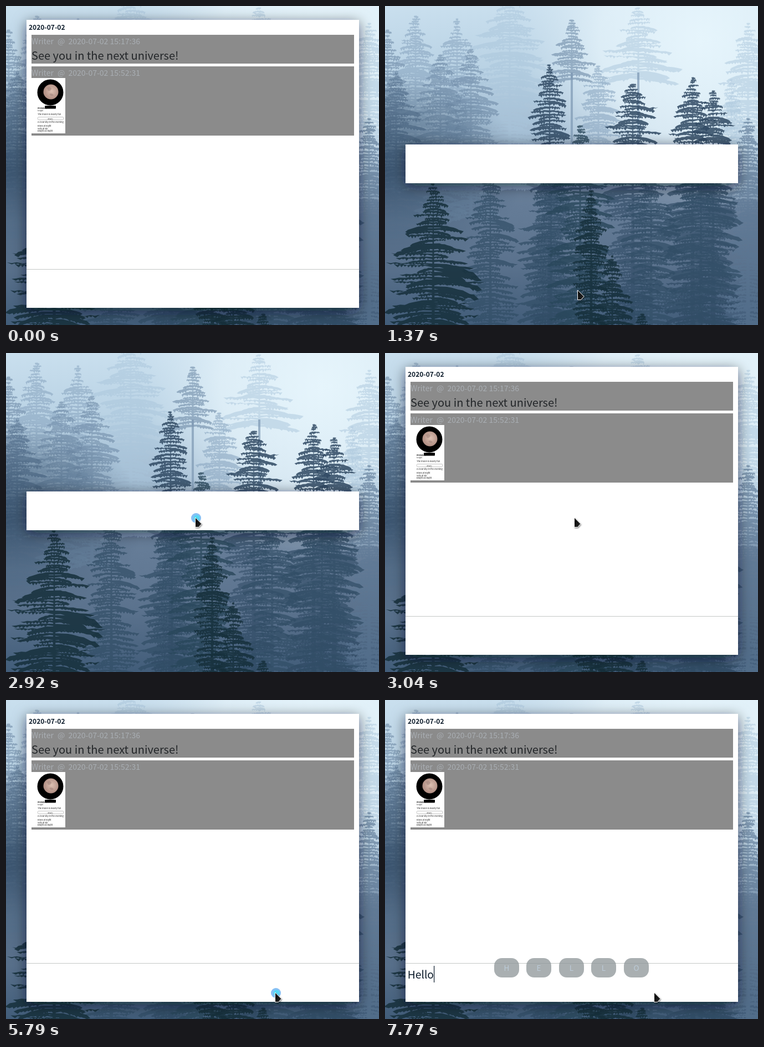
Animation, 673 px wide and 576 px high, one loop 8000 ms. Source, as an HTML page:

```html
<!DOCTYPE html>
<html lang="en">
<head>
<meta charset="utf-8">
<title>Message log</title>
<style>
html, body { margin: 0; width: 100%; height: 100%; overflow: hidden; }
#stage { display: block; width: 673px; height: 576px; font-family: "Noto Sans CJK SC", "Noto Sans CJK JP", "Noto Sans CJK", "Noto Sans", sans-serif; }
text { white-space: pre; }
.meta { font-size: 14px; fill: #a9aeb3; }
.tiny { font-size: 4px; fill: #222; }
.key { font-size: 13.5px; font-weight: 300; fill: #bccbd8; text-anchor: middle; }
</style>
</head>
<body>
<svg id="stage" viewBox="0 0 673 576" xmlns="http://www.w3.org/2000/svg">
  <defs>
    <linearGradient id="sky" x2="0" y2="1">
      <stop offset="0" stop-color="#c9dfee"/>
      <stop offset=".2" stop-color="#b9d2e4"/>
      <stop offset=".4" stop-color="#a2bbd1"/>
      <stop offset=".56" stop-color="#6a809b"/>
      <stop offset=".8" stop-color="#5f7590"/>
      <stop offset="1" stop-color="#425d7a"/>
    </linearGradient>
    <radialGradient id="glow" gradientUnits="userSpaceOnUse" cx="570" cy="60" r="330">
      <stop offset="0" stop-color="#e6f5fc"/>
      <stop offset=".55" stop-color="#e2f1f9" stop-opacity=".85"/>
      <stop offset="1" stop-color="#d8e9f4" stop-opacity="0"/>
    </radialGradient>
    <radialGradient id="leftShade">
      <stop offset="0" stop-color="#1d3650" stop-opacity=".65"/>
      <stop offset="1" stop-color="#1d3650" stop-opacity="0"/>
    </radialGradient>
    <linearGradient id="mist" x2="0" y2="1">
      <stop offset="0" stop-color="#5f7893" stop-opacity="0"/>
      <stop offset=".4" stop-color="#5f7893" stop-opacity=".4"/>
      <stop offset="1" stop-color="#3e5a76" stop-opacity=".15"/>
    </linearGradient>
    <linearGradient id="pointer" x2="1" y2="1">
      <stop offset="0" stop-color="#000"/>
      <stop offset="1" stop-color="#2c2c2c"/>
    </linearGradient>
    <radialGradient id="moon" cx=".55" cy=".45">
      <stop offset="0" stop-color="#dcc0b2"/>
      <stop offset="1" stop-color="#b39186"/>
    </radialGradient>
    <filter id="windowShadow" x="-20%" y="-60%" width="140%" height="240%">
      <feDropShadow dx="0" dy="5" stdDeviation="12" flood-color="#06121e" flood-opacity=".6"/>
    </filter>
    <filter id="pointerShadow" x="-50%" y="-50%" width="200%" height="200%">
      <feDropShadow dx="1" dy="1.5" stdDeviation="1" flood-opacity=".45"/>
    </filter>
  </defs>

  <rect width="673" height="576" fill="url(#sky)"/>
  <rect width="673" height="576" fill="url(#glow)"/>
  <g id="forest"></g>

  <g id="log">
    <rect x="37" y="25" width="600" height="520" fill="#fff" filter="url(#windowShadow)"/>
    <text x="41" y="43" font-size="12" font-weight="700" fill="#0c1b2a">2020-07-02</text>
    <path d="M46 52h582v52h-582zM46 109h582v125h-582z" fill="#8b8b8b"/>
    <g class="meta">
      <text x="46" y="69">Writer</text><text x="93" y="69">@  2020-07-02 15:17:36</text>
      <text x="46" y="126">Writer</text><text x="93" y="126">@  2020-07-02 15:52:31</text>
    </g>
    <text x="46" y="97" font-size="20" fill="#232629">See you in the next universe!</text>
    <rect x="46" y="130" width="61" height="100" fill="#fff"/>
    <circle cx="80" cy="156" r="23.5"/>
    <circle cx="81" cy="155" r="13.5" fill="url(#moon)"/>
    <path d="M74 148q5 -4 8 1q-1 5 -6 4zM78 159q5 -3 8 2q-4 4 -8 -2z" fill="#977a73" opacity=".45"/>
    <rect x="70" y="180" width="20" height="5.5" rx="1"/>
    <rect x="57.5" y="200.5" width="46" height="5" rx="1" fill="none" stroke="#aaa" stroke-width=".7"/>
    <g class="tiny">
      <text x="57" y="186" font-weight="700">MONDAY</text>
      <text x="57" y="190" font-size="3">tonight</text>
      <text x="57" y="197">The moon is nearly full</text>
      <text x="75" y="204.500" font-size="3">details</text>
      <text x="57" y="211">A clear sky in the evening</text>
      <text x="57" y="218">Rises at eight</text>
      <text x="57" y="222.500">Sets at six</text>
      <text x="57" y="227">Bright all night</text>
    </g>
    <path d="M37 475.500H637" stroke="#c4c8c6"/>
    <text id="typed" x="40.700" y="503" font-size="19.300" fill="#0c1b2a"></text>
    <rect id="caret" y="480" width="1.200" height="30" fill="#0c1b2a"/>
  </g>

  <rect id="prompt" x="37" y="250" width="600" height="70" fill="#fff" filter="url(#windowShadow)"/>
  <g id="keys"></g>
  <g id="cursor">
    <g id="press">
      <circle id="halo" cx="2" cy="1" fill="#86c0f4"/>
      <circle id="core" cx="3" cy="1" r="5.500" fill="#55d8f4"/>
    </g>
    <path d="M.5 0V17.500H6.500L12 11.500Z" fill="url(#pointer)" stroke="#fff" filter="url(#pointerShadow)"/>
  </g>
</svg>
<script>
const LOOP = 8000;
const $ = id => document.getElementById(id);

function add(parent, tag, attrs) {
  const el = document.createElementNS("http://www.w3.org/2000/svg", tag);
  for (const name in attrs) el.setAttribute(name, attrs[name]);
  parent.append(el);
  return el;
}

let seed = 11;
const random = () => (seed = seed * 16807 % 2147483647) / 2147483647;

// Cedar: a trunk with feathered branches that reach full width after `crown` pixels.
function treePath(x, top, bottom, reach, crown) {
  const girth = 1 + (bottom - top) / 130;
  let d = `M${x} ${top}L${x + girth} ${bottom}H${x - girth}Z`;
  for (let y = top + 3; y < bottom; y += 3 + random() * 4) {
    const spread = 3 + reach * Math.min(1, (y - top) / crown) ** .85;
    for (const side of [-1, 1]) {
      const w = spread * (.3 + random() * .75);
      const drop = w * (random() * .35 - .05);
      const points = [[0, 0]];
      for (let u = .3; u < 1; u += .25) points.push([u * w, drop * u * u - 1], [(u + .1) * w, drop * u * u + .5]);
      points.push([w, drop]);
      for (let u = .9; u > .2; u -= 3.5 / w + .04) {
        points.push([u * w, drop * u + 2 + random() * 4], [(u - .06) * w, drop * u + 1.5]);
      }
      points.push([0, 4]);
      // One winding for both sides keeps overlaps solid.
      if (side < 0) points.reverse();
      d += "M" + points.map(([px, py]) => `${(x + side * px).toFixed(1)} ${(y + py).toFixed(1)}`).join("L") + "Z";
    }
  }
  return d;
}

function plant(color, opacity, trees) {
  for (const tree of trees) add($("forest"), "path", { d: treePath(...tree), fill: color, opacity });
}

function shade(shape, fill, box) {
  add($("forest"), shape, { fill, ...box });
}

plant("#a9c6db", .5, [[225, -30, 330, 70, 100], [457, 0, 130, 85, 120], [655, 28, 350, 50, 90], [625, 130, 320, 28, 70]]);
plant("#8ba7c1", .6, [[55, 15, 330, 45, 90], [130, 20, 330, 45, 90], [385, 105, 330, 42, 70]]);
plant("#7591ad", .65, [[5, 40, 330, 38, 90], [337, 22, 130, 42, 75], [100, 85, 380, 45, 80], [155, 75, 380, 48, 90]]);
plant("#5f7a97", .65, [[20, 118, 420, 50, 80], [655, 200, 590, 48, 100]]);
shade("ellipse", "url(#leftShade)", { cx: 0, cy: 300, rx: 250, ry: 180 });
add($("forest"), "path", { d: "M457 120V260M337 120V260", stroke: "#7d98b3", "stroke-width": 4, opacity: .7 });
plant("#2f4963", .85, [[297, 103, 590, 35, 70], [447, 138, 590, 52, 60], [555, 126, 590, 46, 90], [592, 150, 590, 42, 75]]);
shade("rect", "url(#mist)", { x: 0, y: 270, width: 673, height: 306 });
plant("#314d65", .7, [[190, 290, 600, 48, 110], [300, 270, 600, 62, 130], [480, 280, 620, 55, 110], [570, 260, 620, 75, 100]]);
plant("#28465a", .8, [[352, 213, 610, 58, 120]]);
plant("#162f3b", .85, [[87, 318, 620, 85, 150], [410, 448, 620, 38, 90], [372, 330, 620, 30, 90], [465, 553, 610, 35, 40]]);

const linear = u => u, easeIn = u => u * u, easeOut = u => u * (2 - u);
const path = [
  [280, 315, 474, linear],
  [480, 362, 528, easeOut],
  [620, 351, 518, easeOut],
  [780, 351, 518, linear],
  [860, 347, 513, linear],
  [1500, 347, 513, linear],
  [1760, 349, 420, easeIn],
  [1980, 345, 336, linear],
  [2220, 341, 297, easeOut],
  [3200, 341, 297, linear],
  [3640, 388, 372, easeIn],
  [4000, 485, 528, easeOut]
];

function cursorAt(t) {
  const next = path.findIndex(p => p[0] > t);
  if (next < 0) return path[path.length - 1].slice(1, 3);
  if (next === 0) return path[0].slice(1, 3);
  const a = path[next - 1], b = path[next];
  const u = b[3]((t - a[0]) / (b[0] - a[0]));
  return [a[1] + (b[1] - a[1]) * u, a[2] + (b[2] - a[2]) * u];
}

const CLOSE = 1370, OPEN = 2960;
const presses = [[1210, CLOSE], [2840, OPEN], [5790, 6150]];
const SHIFT = "R SHIFT";
// time, typed text, caret shown, key labels
const typing = [
  [0, "", false, []],
  [6360, "", false, [SHIFT]],
  [6700, "H", true, [SHIFT, "H"]],
  [7060, "He", true, [SHIFT, "H"]],
  [7240, "He", false, [SHIFT, "H", "E"]],
  [7400, "Hel", true, [SHIFT, "H", "E", "L"]],
  [7570, "Hell", true, [SHIFT, "H", "E", "L", "L"]],
  [7770, "Hello", true, ["H", "E", "L", "L", "O"]]
];

const keys = Array.from({ length: 5 }, () => {
  const box = add($("keys"), "svg", { y: 466, width: 45, height: 35 });
  add(box, "rect", { width: 45, height: 35, rx: 14, fill: "#8d9597", opacity: .75 });
  return { box, label: add(box, "text", { x: 22.5, y: 23, class: "key" }) };
});

const show = (el, on) => el.setAttribute("display", on ? "inline" : "none");

function drawTyping(t) {
  const [, text, caret, labels] = typing.filter(s => s[0] <= t).pop();
  const typed = $("typed");
  if (typed.textContent !== text) typed.textContent = text;
  show($("caret"), caret);
  $("caret").setAttribute("x", Math.floor(40.7 + (text ? typed.getComputedTextLength() : 0)));
  const pitch = labels.length === 2 ? 60 : 58.5;
  keys.forEach(({ box, label }, i) => {
    show(box, i < labels.length);
    box.setAttribute("x", Math.floor(314 + (i - (labels.length - 1) / 2) * pitch));
    label.textContent = labels[i] || "";
  });
}

function drawCursor(t) {
  const [x, y] = cursorAt(t);
  show($("cursor"), t >= 280);
  $("cursor").setAttribute("transform", `translate(${Math.round(x)} ${Math.round(y)})`);
  const press = presses.find(([from, to]) => t >= from && t < to);
  show($("press"), press);
  if (!press) return;
  const fade = Math.max(0, (t - press[0] - 120) / 240);
  $("halo").setAttribute("r", 9 + 4 * fade);
  $("press").setAttribute("opacity", 1 - fade);
}

function draw(t) {
  const prompting = t >= CLOSE && t < OPEN;
  show($("log"), !prompting);
  show($("prompt"), prompting);
  drawTyping(t);
  drawCursor(t);
}

const start = performance.now();
function tick(now) {
  draw(Math.max(0, now - start) % LOOP);
  requestAnimationFrame(tick);
}
draw(0);
requestAnimationFrame(tick);
</script>
</body>
</html>
```
